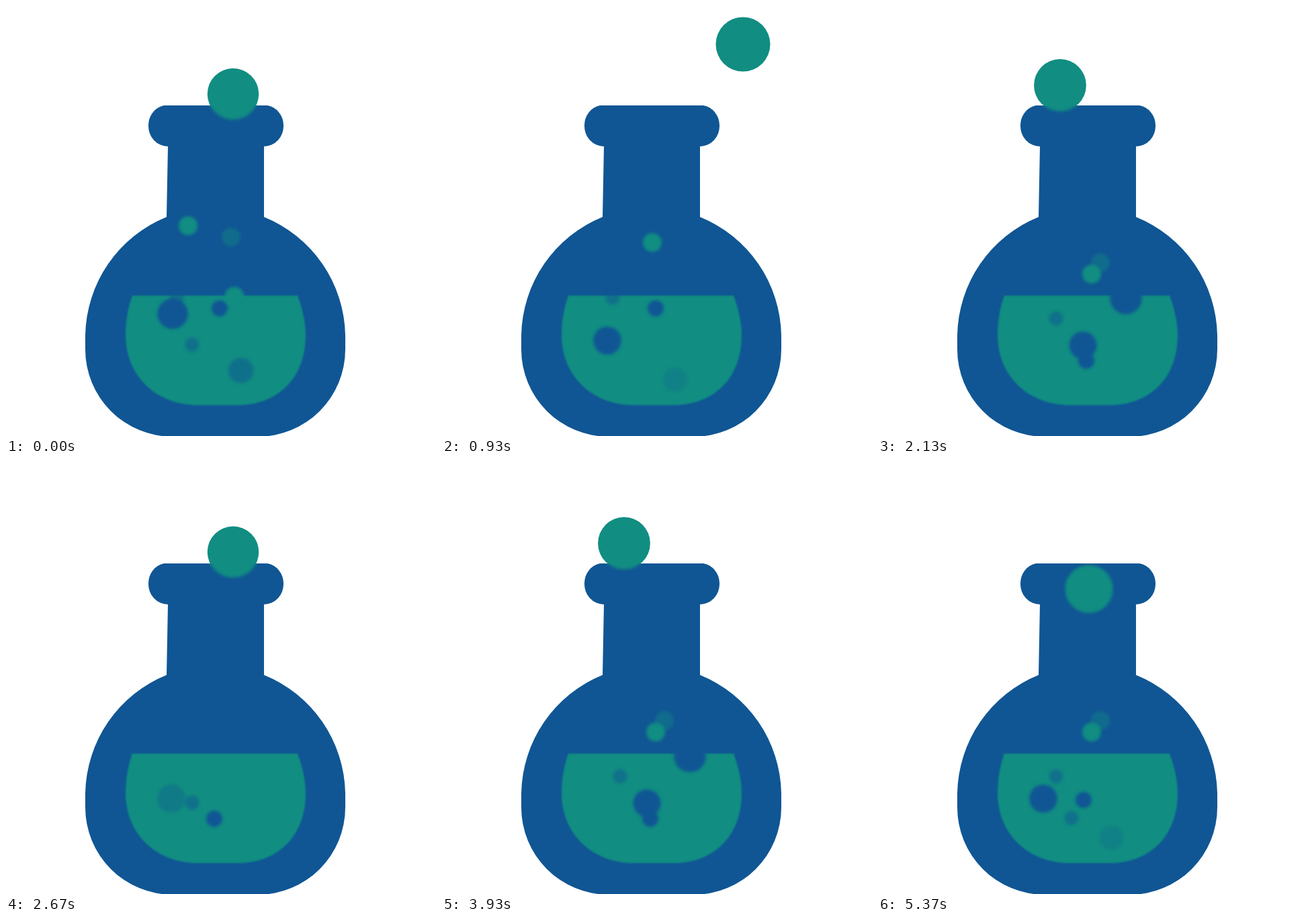
Recreate the animation shown at these times as an HTML page with a canvas. Size 640x640 px, loop 5410 ms.

```html
<!DOCTYPE html>
<html lang="en">
<head>
<meta charset="utf-8">
<title>Bubbling flask</title>
<style>
html, body { margin: 0; height: 100%; overflow: hidden; background: #fff }
canvas { display: block }
</style>
</head>
<body>
<canvas id="stage" width="640" height="640"></canvas>
<script>
const ctx = document.getElementById('stage').getContext('2d');
const BLUE = '#105694', GREEN = '#118d82';
const CYCLE = 45, SURFACE = 433;

const flask = new Path2D(`M241 209 A29 30 0 0 1 212 178 A29 30 0 0 1 235 148 H389
  A29 30 0 0 1 413 178 A29 30 0 0 1 384 209 V314 A194 194 0 0 1 505 490 V511
  A130 130 0 0 1 375 641 H248 A130 130 0 0 1 118 511 V490 A194 194 0 0 1 239 314 Z`);
const liquid = new Path2D(`M188 431 C181 450 178 470 178 490 C178 552 225 594 285 594
  H345 C402 594 446 556 446 490 C446 470 441 450 434 431 Z`);

// Big bubbles fade in at `birth` and pop at the last point: [step, x, y]
const batchStarts = [23, 44];
const risers = [
  { birth: -3, path: [[0, 246, 498], [1, 248, 458], [9, 271, 118], [12, 215, 62]] },
  { birth: -.6, path: [[0, 347, 556], [9, 369, 435], [12, 347, 362], [20, 208, 41]] },
  { birth: 6, path: [[9, 305, 505], [12, 307, 487], [21, 314, 186], [22, 338, 131], [24, 448, 57]] }
];

// Small bubbles move one point [x, y] further in each step
const streams = [
  { alpha: 1, starts: [8, 21, 43], path: [[310, 528], [306, 500], [318, 450]] },
  { alpha: .5, starts: [6, 20, 34, 42, 44], path: [[288, 527], [277, 504], [265, 465], [254, 434]] },
  { alpha: .4, starts: [8, 44], path: [[331, 382], [335, 344]] },
  { alpha: 1, starts: [8, 34, 44], path: [[318, 399], [271, 327]] },
  { alpha: 1, starts: [0, 22, 34, 35], path: [[340, 432], [313, 352]] }
];

const clamp = (v, lo, hi) => Math.max(lo, Math.min(hi, v));
const stepsSince = (frame, start) => (frame - start + CYCLE + 3) % CYCLE - 3;

function along(path, step) {
  const i = Math.max(1, path.findIndex(key => key[0] >= step));
  const [t0, x0, y0] = path[i - 1], [t1, x1, y1] = path[i];
  const p = clamp((step - t0) / (t1 - t0), 0, 1);
  return { x: x0 + (x1 - x0) * p, y: y0 + (y1 - y0) * p };
}

function bubblesAt(frame) {
  const bubbles = [];
  for (const { alpha, starts, path } of streams) for (const start of starts) {
    const point = path[stepsSince(frame, start)];
    if (!point) continue;
    const [x, y] = point;
    bubbles.push({ x, y, r: y < SURFACE ? 14 : 9 + 3 * alpha, alpha });
  }
  for (const { birth, path } of risers) for (const start of batchStarts) {
    const step = stepsSince(frame, start);
    if (step <= birth || step > path.at(-1)[0]) continue;
    const { x, y } = along(path, step);
    bubbles.push({ x, y, r: Math.min(40.5, 44.5 - y / 21), alpha: clamp((step - birth) / 3, 0, 1) });
  }
  return bubbles;
}

function drawBubble({ x, y, r, alpha }) {
  ctx.globalAlpha = alpha;
  ctx.fillStyle = y < SURFACE ? GREEN : BLUE;
  ctx.beginPath();
  ctx.arc(x, y, r, 0, 2 * Math.PI);
  ctx.fill();
  ctx.globalAlpha = 1;
}

function fillShape(path, color) {
  ctx.fillStyle = color;
  ctx.fill(path);
}

function draw(frame) {
  const bubbles = bubblesAt(frame);
  ctx.clearRect(0, 0, 640, 640);
  bubbles.forEach(drawBubble);
  fillShape(flask, BLUE);
  // Inside the glass the edges are soft
  ctx.save();
  ctx.clip(flask);
  ctx.filter = 'blur(1.3px)';
  fillShape(liquid, GREEN);
  ctx.filter = 'blur(2.3px)';
  bubbles.forEach(drawBubble);
  ctx.restore();
}

// Five pictures every 200 ms, the first held longest
function frameAt(ms) {
  const t = Math.min(ms % 5410, 5399);
  const late = [70, 100, 130, 170].filter(s => t % 200 >= s).length;
  return (Math.floor(t / 200) * 5 + late) % CYCLE;
}

const begin = performance.now();
function tick() {
  draw(frameAt(performance.now() - begin));
  requestAnimationFrame(tick);
}
tick();
</script>
</body>
</html>
```
